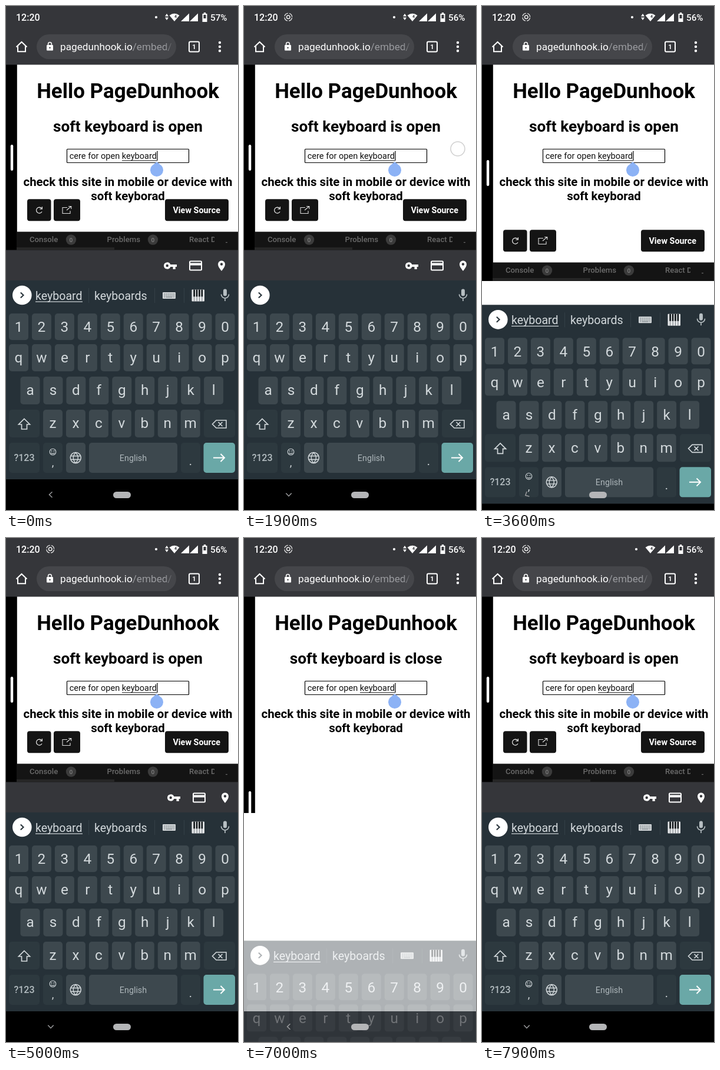
Recreate the animation shown at these times as an HTML page. Size 394 by 854 pixels, loop 8 s.

```html
<!DOCTYPE html>
<html lang="en">
<head>
<meta charset="utf-8">
<title>Soft keyboard demo</title>
<style>
  html, body { margin: 0; width: 100%; height: 100%; overflow: hidden; background: #000; }
  svg { display: block; width: 100%; height: 100%; font-family: Roboto, sans-serif; }
</style>
</head>
<body>
<svg id="stage" viewBox="0 0 394 854" preserveAspectRatio="none"></svg>
<script>
const LOOP = 8000;
const stage = document.getElementById('stage');

const rect = (x, y, w, h, fill, r = 0, extra = '') =>
  `<rect x="${x}" y="${y}" width="${w}" height="${h}" rx="${r}" fill="${fill}" ${extra}/>`;
const circle = (x, y, r, fill, extra = '') =>
  `<circle cx="${x}" cy="${y}" r="${r}" fill="${fill}" ${extra}/>`;
const text = (x, y, size, fill, str, extra = '') =>
  `<text x="${x}" y="${y}" font-size="${size}" fill="${fill}" ${extra}>${str}</text>`;
const line = (d, color, w = 1.5, extra = '') =>
  `<path d="${d}" fill="none" stroke="${color}" stroke-width="${w}" ${extra}/>`;
const shape = (d, fill) => `<path d="${d}" fill="${fill}" fill-rule="evenodd"/>`;
const group = (id, body, extra = '') => `<g id="${id}" ${extra}>${body}</g>`;
const MID = 'text-anchor="middle"';
const MED = 'font-weight="500"';
const BOLD = 'font-weight="700" text-anchor="middle"';

const BAR = '#35363a', INK = '#d3d9dc', DARK = '#141414';

function statusBar() {
  return rect(0, 0, 394, 99.5, BAR) +
    text(17, 25, 16, '#fff', '12:20', MED) +
    group('record',
      circle(75.2, 18.8, 2.8, 'none', 'stroke="#eee" stroke-width="1.5"') +
      circle(75.2, 18.8, 6.4, 'none', 'stroke="#e4e4e4" stroke-width="1.3" stroke-dasharray="7.8 2.25" stroke-dashoffset="-1.1"')) +
    circle(255, 19, 2.1, '#fff', 'id="dot"') +
    group('arrows', shape('M270 17.5l3-4.5 3 4.5zM270 19.5h6l-3 4.5z', '#fff')) +
    shape('M277.5 16Q286 9.5 294.5 16L286 26z', '#fff') +
    text(288, 20, 7, BAR, '4', MID + ' font-weight="700"') +
    shape('M297 26L311 12.5V26zM312 26L326 12.5V26z', '#fff') +
    shape('M333.5 13h2.3v-2h3.4v2h2.3v14h-8zM335.5 15v6h4v-6z', '#fff') +
    text(347, 25, 15.2, '#fff', '', MED + ' id="battery"');
}

function toolbar() {
  return line('M17.5 69.5L26.5 61L35.5 69.5M20 68V77.3H33V68', '#fff', 2) +
    rect(52, 48, 237, 42, '#45464a', 21) +
    rect(69, 66, 11, 9.5, '#fff', 1.2) + circle(74.5, 70.7, 1.3, '#45464a') +
    line('M71.6 66V64.3a2.9 2.9 0 0 1 5.8 0V66', '#fff', 1.5) +
    `<g clip-path="url(#url)">${text(92, 75, 17.2, '#fff', 'pagedunhook.io<tspan fill="#9a9b9f">/embed/</tspan>')}</g>` +
    rect(270, 58, 12, 22, 'url(#fade)') +
    rect(311, 60.5, 17, 17, 'none', 2, 'stroke="#fff" stroke-width="2"') +
    text(319.5, 73, 11, '#fff', '1', MID + ' font-weight="700"') +
    [62, 69, 76].map(y => circle(363, y, 2.2, '#fff')).join('');
}

function content() {
  const lead = 'cere for open ';
  return text(207, 156, 34.9, '#000', 'Hello PageDunhook', BOLD) +
    text(207, 213, 26.25, '#000', '', BOLD + ' id="title"') +
    rect(103.5, 242.5, 207, 23, '#fff', 1, 'id="field" stroke="#000"') +
    text(107.7, 259, 14.55, '#111', lead + 'keyboard') +
    text(207, 305, 20.4, '#000', 'check this site in mobile or device with', BOLD) +
    text(207, 329, 20.4, '#000', 'soft keyborad', BOLD) +
    group('focus',
      rect(197, 261.5, 59.5, 1, '#111') +
      rect(256.3, 245.5, 1.2, 16.5, '#000', 0, 'id="caret"') +
      shape('M256 264L264.5 271A11 11 0 1 1 247.5 271z', '#8cb2f5'));
}

// Parts fixed to the lower edge of the web view; y = 0 is that edge.
function footer() {
  const badge = x => circle(x, -18, 8.7, '#3b3b3b') + text(x, -14.5, 9.5, '#999', '0', MID);
  const label = (x, s) => text(x, -14, 13.2, '#6b6b6b', s, MED);
  return rect(18, -31.5, 376, 31.5, DARK) + rect(18, -5, 166, 4, '#262626') +
    label(40, 'Console') + badge(110.5) + label(171.5, 'Problems') + badge(249.5) +
    `<g clip-path="url(#tab)">${label(311, 'React DevTools')}</g>` +
    rect(373, -14, 3, 1.2, '#666') +
    [[36, 40.5], [81, 45], [270, 108]].map(([x, w]) =>
      rect(x, -86.7, w, 37, DARK, 4)).join('') +
    line('M60.5 -71A5 5 0 1 0 61 -65.5M61.3 -74V-70H57.3', '#fff', 1.1) +
    line('M104 -72.5H96V-62.5H109V-67M103 -68L110.5 -74.5M106 -74.5H110.8V-70', '#ddd', 1.1) +
    text(323.7, -63.5, 14.4, '#fff', 'View Source', BOLD);
}

function accessory() {
  return rect(0, 413.5, 394, 52, BAR) + group('tools',
    shape('M274 440a5.8 5.8 0 0 1 11.2-2H296v4h-2.3v4h-4.2v-4h-4.3A5.8 5.8 0 0 1 274 440zM277.5 440a2.2 2.2 0 1 0 4.4 0 2.2 2.2 0 1 0-4.4 0z', '#fff') +
    rect(318, 432.5, 20, 15, 'none', 1.5, 'stroke="#fff" stroke-width="2"') + rect(318, 435.5, 20, 4, '#fff') +
    shape('M372 449C368 444 366 441 366 437.5a6 6 0 0 1 12 0C378 441 376 444 372 449zM369.8 437.5a2.2 2.2 0 1 0 4.4 0 2.2 2.2 0 1 0-4.4 0z', '#fff'));
}

function keyboard() {
  const KEY = '#3d484e', FN = '#2d393f';
  const row = (chars, x, y, h) => [...chars].map((c, i) => {
    const cx = x + i * 38.95;
    return rect(cx - 16.5, y, 33, h, KEY, 5) + text(cx, y + 31.3, 24.3, INK, c, MID);
  }).join('');
  const emojiKeys = [0, 1, 2].map(j => [0, 1, 2, 3, 4, 5].map(i =>
    rect(268 + i * 3.2, 487 + j * 2.6, 2.2, 1.6, '#8d9599')).join('')).join('');
  const piano = rect(315.5, 480.5, 21.5, 20, '#e4e6e8', 1) +
    [0, 1, 2, 3].map(i =>
      rect(318.3 + i * 4.4, 480.5, 2.7, 12, '#12181b') + rect(319.3 + i * 4.4, 492, .8, 8.5, '#586066')).join('');
  return rect(0, 465, 394, 337, '#263138') + rect(0, 802, 394, 52, '#000') +
    circle(27.3, 490, 16.3, '#fff') + line('M24.8 485.5L29.6 490L24.8 494.5', '#263138', 2) +
    group('suggest',
      text(50, 498, 19.6, INK, 'keyboard') + rect(50, 500.5, 80, 1.2, INK) +
      text(150, 498, 19.6, INK, 'keyboards') +
      [140, 252, 302].map(x => rect(x, 478, 1, 25, '#344047')).join('') +
      rect(266, 485, 22, 11, '#d5d9db', 1) + emojiKeys + rect(272, 492.5, 10, 1.6, '#8d9599') + piano) +
    rect(369, 479.5, 6, 12, '#b6bec2', 3) +
    line('M365.5 488.5a6.5 6.5 0 0 0 13 0M372 495V500', '#b6bec2', 1.7) +
    row('1234567890', 21.5, 521, 45) + row('qwertyuiop', 21.5, 573, 46) +
    row('asdfghjkl', 41, 628, 47) + row('zxcvbnm', 79.5, 684, 47) +
    rect(5, 684, 52, 47, FN, 5) + rect(336, 684, 53, 47, FN, 5) +
    line('M31 699.5L40.5 709H35.5V717H26.5V709H21.5z', INK, 1.7) +
    line('M357 702H374V715H357L350.5 708.5zM360.5 705L367.5 712M367.5 705L360.5 712', INK, 1.6) +
    rect(5, 740, 52, 51, FN, 5) + text(31, 771, 16, '#b4bdc1', '?123', MID + ' ' + MED) +
    rect(63, 740, 33, 51, FN, 5) + text(79.5, 780, 18, INK, ',', MID) +
    circle(79.5, 755.5, 5.3, 'none', `stroke="${INK}" stroke-width="1.1"`) +
    circle(77.5, 754, .9, INK) + circle(81.5, 754, .9, INK) + line('M76.5 757q3 3 6 0', INK, 1.1) +
    rect(102, 740, 33, 51, KEY, 5) +
    circle(118.3, 765.5, 9, 'none', `stroke="${INK}" stroke-width="1.5"`) +
    line('M110 762.5H126.6M110 768.5H126.6M118.3 756.5q-8 9 0 18q8 -9 0 -18', INK, 1.3) +
    rect(141, 740, 150, 51, KEY, 5) + text(216, 770.5, 14.3, '#adb6ba', 'English', MID) +
    rect(297, 740, 33, 51, FN, 5) + text(313.5, 778, 20, INK, '.', MID) +
    rect(335.5, 740, 53.5, 51, '#6aa8a7', 5) +
    line('M352 765.5H371M364.5 759L371 765.5L364.5 772', '#fff', 2);
}

stage.innerHTML = `<defs>
  <clipPath id="url"><rect x="90" y="50" width="191" height="40"/></clipPath>
  <clipPath id="tab"><rect x="310" y="-32" width="44" height="32"/></clipPath>
  <clipPath id="view"><rect id="viewRect" x="0" y="99" width="394" height="703"/></clipPath>
  <linearGradient id="fade"><stop stop-color="#45464a" stop-opacity="0"/><stop offset="1" stop-color="#45464a" stop-opacity=".8"/></linearGradient>
</defs>` +
  rect(0, 99, 394, 703, '#fff') +
  `<g clip-path="url(#view)">` +
  rect(0, 99, 18.8, 703, '#000') + rect(7.8, -22, 4.4, 44, '#fff', 2.2, 'id="handle"') +
  content() + group('footer', footer()) + '</g>' +
  rect(0, 802, 394, 52, BAR) + rect(0, 801, 394, 1, '#222', 0, 'id="edge"') +
  group('accessory', accessory()) + group('keyboard', keyboard()) +
  statusBar() + toolbar() +
  group('back', line('M78.5 823.3L73.5 828L78.5 832.7', '#9a9b9d', 1.5)) +
  rect(182, 823, 30, 11, '#b4b5b7', 5.5) +
  circle(0, 0, 12, '#fff', 'id="ring" fill-opacity=".85" stroke="#cfcfcf" stroke-width="1.5"');

const el = {};
stage.querySelectorAll('[id]').forEach(n => el[n.id] = n);
const set = (id, name, value) => el[id].setAttribute(name, value);
const show = (id, on) => set(id, 'display', on ? 'inline' : 'none');
const ramp = (t, start, span) => Math.min(1, Math.max(0, (t - start) / span));
const within = (t, spans) => spans.find(([a, b]) => t >= a && t < b);

const SLIDE = 388, FULL = 802;
const opens = [-1000, 3419, 6935], closes = [1950, 5720];
const blinks = [[150, 650], [1150, 1650], [4450, 4950], [5480, 5720], [7100, 7600]];
const blanks = [[1800, 2300], [5600, 6100]];
const taps = [[1700, 1950, 363, 242], [2260, 3450, 294, 255], [5500, 5720, 363, 242], [6700, 6950, 294, 255]];

function keyboardState(t) {
  const opened = opens.filter(s => s <= t).pop();
  const closed = closes.filter(s => s <= t).pop() ?? -9999;
  if (closed > opened) {
    const p = ramp(t, closed, 230), dt = t - closed;
    return { offset: SLIDE * p * p, alpha: 1 - p, bottom: dt < 100 ? 466 : FULL, clip: FULL,
      focus: false, tools: 0, turn: 1 - ramp(dt, 50, 200) };
  }
  const dt = t - opened, p = ramp(dt, 0, 285);
  return {
    offset: SLIDE * (1 - p) ** 2.2, alpha: Math.min(1, p * 1.6),
    bottom: dt < 130 ? FULL : dt < 330 ? 466 : 414, clip: dt < 330 ? 466 : 414,
    focus: true, tools: ramp(dt, 330, 300), turn: t < 1000 ? ramp(t, 50, 200) : ramp(dt, 120, 200)
  };
}

function draw(t) {
  const k = keyboardState(t);
  set('keyboard', 'transform', `translate(0 ${k.offset})`);
  set('keyboard', 'opacity', k.alpha);
  set('viewRect', 'height', k.clip - 99);
  set('footer', 'transform', `translate(0 ${k.bottom})`);
  set('handle', 'transform', `translate(0 ${(100 + k.bottom) / 2})`);
  el.title.textContent = 'soft keyboard is ' + (k.bottom === FULL ? 'close' : 'open');
  show('focus', k.focus);
  show('caret', !within(t, blinks));
  set('field', 'stroke', k.focus ? '#000' : '#666');
  set('field', 'stroke-width', k.focus ? 1.2 : 1);
  show('edge', k.bottom === FULL && k.clip === FULL);
  show('suggest', !within(t, blanks));

  show('accessory', k.tools > 0);
  const slide = t < 1000 ? -6 * (1 - ramp(t, 0, 150)) : -44 * (1 - k.tools) ** 2;
  set('tools', 'transform', `translate(${slide} 0)`);
  set('back', 'transform', `rotate(${-90 * k.turn} 76 828)`);

  const tap = within(t, taps);
  show('ring', tap);
  if (tap) set('ring', 'transform', `translate(${tap[2]} ${tap[3]})`);

  show('record', t >= 300);
  el.battery.textContent = t < 300 ? '57%' : '56%';
  show('arrows', t < 7900);
  set('dot', 'cx', t < 7900 ? 255 : 262);
}

const start = performance.now();
function tick() {
  draw((performance.now() - start) % LOOP);
  requestAnimationFrame(tick);
}
tick();
</script>
</body>
</html>
```
